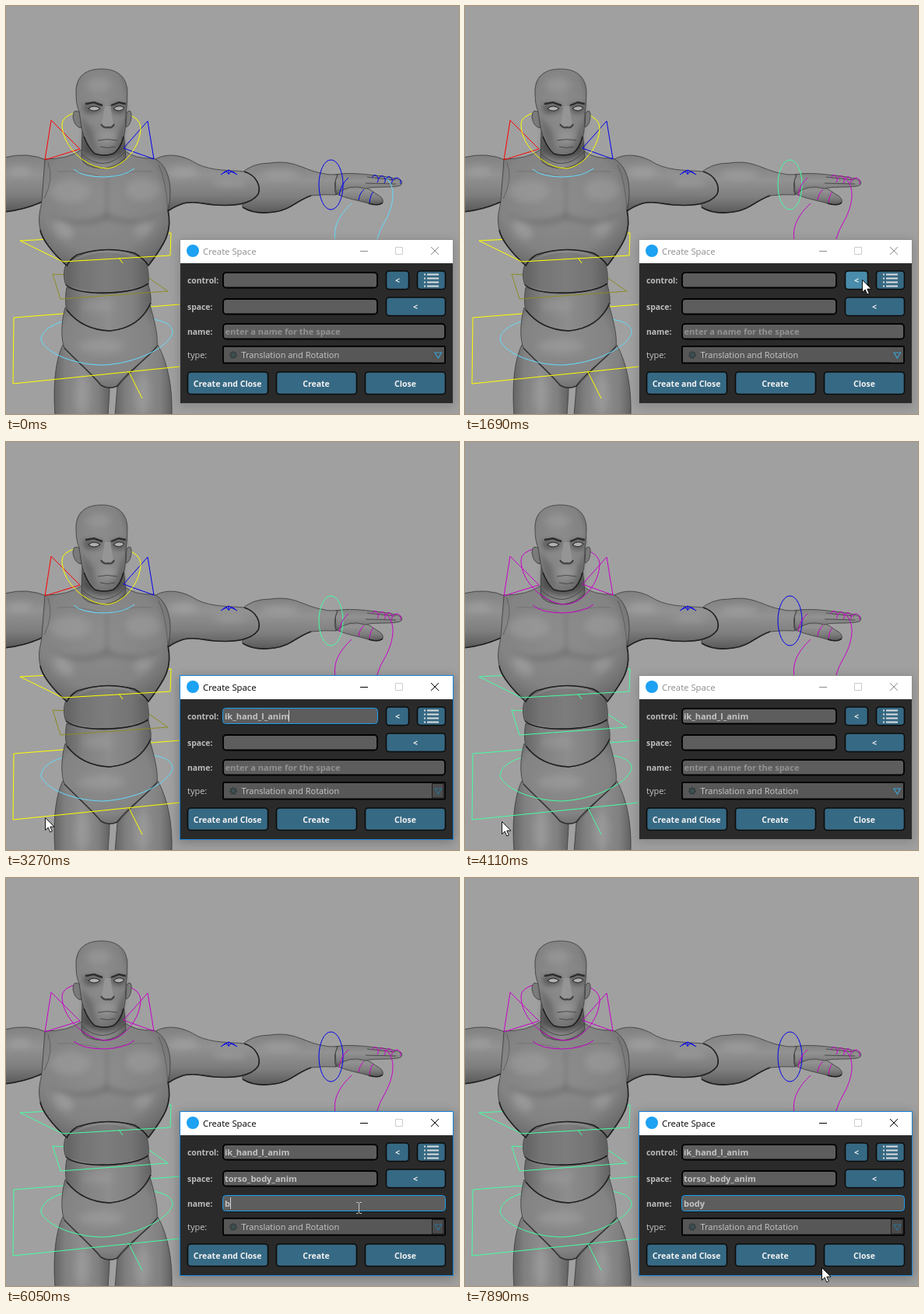
These frames come from a looping animation (582x525 px, 8 s). An HTML page:

```html
<!DOCTYPE html>
<html lang="en">
<head>
<meta charset="utf-8">
<title>Create Space</title>
<style>
html, body { margin: 0; width: 100%; height: 100%; overflow: hidden; background: #a0a0a0; }
svg {
  display: block; width: 100vw; height: 100vh;
  --hand: #00e; --curve: #64dcff; --finger: #00e;
  --rig: #ff0; --mid: #8c8c22; --hip: #64dcff;
  --neck: #ff0; --collar: #64dcff; --left: #f00; --right: #00e;
  --frame: #8d8d8d; --title: #8c8c8c; --shade: .16; --arrow: #3c9fd0; --drop: #555; --dropEdge: #555;
  --control: 0; --name: 0;
  --pick: #366984; --spaceBtn: #366984; --closeBtn: #366984;
  --t1: 0; --t2: 0; --hint: 1; --b: 0; --o: 0; --d: 0; --y: 0; --caret: 0;
  animation: scene 8s step-end -8ms infinite;
}
@keyframes scene {
  15.125% { --hand: #43ffa3; --curve: #c800c8; --finger: #c800c8; }
  19.625% { --pick: #4a8cab; }
  24.25% { --frame: #1883d7; --title: #000; --shade: .26; --arrow: #2f6f8f; --drop: #4b4b4b; --dropEdge: #1c1c1c; --control: 1; }
  25.75% { --t1: 1; --caret: 1; }
  30.375% { --caret: 0; }
  34.875% { --pick: #366984; }
  36.375% { --caret: 1; }
  42.375% { --frame: #8d8d8d; --title: #8c8c8c; --shade: .16; --arrow: #3c9fd0; --drop: #555; --dropEdge: #555; --control: 0; --caret: 0; }
  43.875% {
    --hand: #00e; --rig: #43ffa3; --mid: #43ffa3; --hip: #43ffa3;
    --neck: #c800c8; --collar: #c800c8; --left: #c800c8; --right: #c800c8;
  }
  60.375% { --spaceBtn: #4a8cab; }
  61.875% { --frame: #1883d7; --title: #000; --shade: .26; --arrow: #2f6f8f; --drop: #4b4b4b; --dropEdge: #1c1c1c; --control: 1; --caret: 1; }
  64.875% { --t2: 1; }
  66.375% { --control: 0; --name: 1; --spaceBtn: #366984; }
  72.5% { --caret: 0; }
  75.625% { --hint: 0; --b: 1; --caret: 1; }
  80.25% { --o: 1; }
  81.75% { --d: 1; }
  86.375% { --y: 1; }
  94.125% { --caret: 0; }
  95.625% { --closeBtn: #4a8cab; }
  98.625% { --closeBtn: #366984; }
  100% {
    --hand: #00e; --curve: #c800c8; --finger: #c800c8; --rig: #43ffa3; --mid: #43ffa3; --hip: #43ffa3;
    --t1: 1; --t2: 1; --hint: 0;
  }
}
#arrow { opacity: 0; animation: arrow 8s step-end -8ms infinite; }
@keyframes arrow {
  0% { opacity: 0; transform: translate(512px, 271px); }
  4.625% { opacity: 1; transform: translate(512px, 271px); }
  6.125% { transform: translate(498px, 262px); }
  7.625% { transform: translate(471px, 241px); }
  9.125% { transform: translate(444px, 218px); }
  10.625% { transform: translate(424px, 203px); }
  12.125% { transform: translate(416px, 197px); }
  13.625% { transform: translate(421px, 199px); }
  16.625% { transform: translate(446px, 242px); }
  18.125% { transform: translate(484px, 309px); }
  19.625% { transform: translate(507px, 347px); }
  21.125% { transform: translate(510px, 352px); }
  30.375% { transform: translate(507px, 352px); }
  33.375% { transform: translate(499px, 357px); }
  34.875% { transform: translate(430px, 385px); }
  36.375% { transform: translate(320px, 425px); }
  37.875% { transform: translate(200px, 458px); }
  39.375% { transform: translate(100px, 477px); }
  40.875% { transform: translate(50px, 483px); }
  42.375% { transform: translate(34px, 484px); }
  46.875% { transform: translate(36px, 485px); }
  49.875% { transform: translate(41px, 486px); }
  51.375% { transform: translate(47px, 488px); }
  52.875% { transform: translate(73px, 505px); }
  54.375% { transform: translate(140px, 498px); }
  55.875% { transform: translate(280px, 462px); }
  57.375% { transform: translate(440px, 414px); }
  58.875% { transform: translate(569px, 378px); }
  60.375% { transform: translate(525px, 378px); }
  61.875% { transform: translate(501px, 380px); }
  66.375% { opacity: 0; transform: translate(453px, 424px); }
  94.125% { opacity: 1; transform: translate(453px, 445px); }
  95.625% { transform: translate(463px, 475px); }
  97.125% { transform: translate(463px, 491px); }
  98.625%, 100% { opacity: 1; transform: translate(458px, 501px); }
}
#beam { opacity: 0; animation: beam 8s step-end -8ms infinite; }
@keyframes beam { 66.375% { opacity: 1; } 94.125% { opacity: 0; } }
#caret { opacity: var(--caret); animation: caret 8s step-end -8ms infinite; }
@keyframes caret {
  0% { transform: translate(363px, 345px); }
  66.375% { transform: translate(281px, 411px); }
  75.625% { transform: translate(288px, 411px); }
  80.25% { transform: translate(295px, 411px); }
  81.75% { transform: translate(302px, 411px); }
  86.375%, 100% { transform: translate(308px, 411px); }
}
text { font: 11px "Open Sans", "Noto Sans", sans-serif; fill: #c8c8c8; }
.label { font-size: 10.4px; font-weight: 700; fill: #bdbdbd; }
.value { font-weight: 700; fill: #c4c4c4; }
.btn text { font-size: 10.5px; font-weight: 700; fill: #f2f2f2; text-anchor: middle; }
.btn rect { fill: #366984; stroke: #0c0c0c; stroke-width: 1.6; }
.field rect { fill: #5d5d5d; stroke: #000; stroke-width: 1.8; }
.field .focus { stroke: #1a9ff0; stroke-width: 1; }
.rig path, .rig ellipse { fill: none; stroke-width: 1; }
.body { stroke: #3a3a3a; stroke-width: .8; stroke-linejoin: round; }
.glow { fill: #b2b2b2; filter: blur(5px); }
.dark { fill: #404040; filter: blur(3px); }
.edge { fill: none; stroke: #202020; stroke-width: 1.6; }
.line { fill: none; stroke: #4a4a4a; stroke-width: 1; }
</style>
</head>
<body>
<svg viewBox="0 0 582 525">
  <defs>
    <radialGradient id="ball" cx=".47" cy=".42" r=".66">
      <stop offset="0" stop-color="#8d8d8d"/><stop offset=".7" stop-color="#838383"/><stop offset="1" stop-color="#666"/>
    </radialGradient>
    <linearGradient id="tube" x2="0" y2="1">
      <stop offset="0" stop-color="#818181"/><stop offset=".35" stop-color="#929292"/>
      <stop offset=".7" stop-color="#7e7e7e"/><stop offset="1" stop-color="#595959"/>
    </linearGradient>
    <linearGradient id="limb">
      <stop offset="0" stop-color="#656565"/><stop offset=".2" stop-color="#808080"/><stop offset=".5" stop-color="#8d8d8d"/>
      <stop offset=".8" stop-color="#808080"/><stop offset="1" stop-color="#626262"/>
    </linearGradient>
  </defs>
  <rect width="582" height="525" fill="#a0a0a0"/>

  <!-- control curves behind the figure -->
  <g class="rig">
    <path stroke="var(--neck)" d="M90 137Q72 142 72 152M155 139Q172 144 173 156"/>
    <path stroke="var(--rig)" d="M18 302L212 292M10 401L223 384"/>
    <path stroke="var(--mid)" d="M60 345L185 351L208 367"/>
    <path stroke="var(--hip)" d="M45 430C45 414 70 405 90 402M180 402C202 404 215 410 214 421"/>
  </g>

  <!-- torso and legs -->
  <g class="body" fill="url(#limb)">
    <path d="M73 436C64 455 60 485 63 527H131C132 510 133 500 133 490Z"/>
    <path d="M195 436C208 460 214 490 213 527H140L143 490Z"/>
    <path fill="url(#ball)" d="M76 388C70 410 71 430 75 440C92 458 112 475 122 488Q132 494 143 489C155 472 180 455 194 438C196 425 190 402 185 385Q172 412 132 418Q95 412 76 388Z"/>
    <path d="M78 362C76 372 76 384 78 391Q98 417 134 418Q172 414 186 382C187 372 184 365 183 358Q130 380 78 362Z"/>
    <path d="M78 330C73 340 74 352 77 359Q90 370 130 369Q168 368 183 357C184 345 182 335 179 327Q130 296 78 330Z"/>
  </g>
  <path d="M78 333Q130 302 181 332V357Q130 378 77 359Z" fill="#555" opacity=".28"/>
  <ellipse class="glow" cx="98" cy="500" rx="10" ry="24" opacity=".3"/>
  <ellipse class="glow" cx="175" cy="500" rx="10" ry="24" opacity=".3"/>
  <ellipse class="glow" cx="122" cy="438" rx="30" ry="9" opacity=".3"/>
  <ellipse class="glow" cx="118" cy="386" rx="20" ry="9" opacity=".25"/>
  <path class="edge" d="M77 359Q90 370 130 369Q168 368 183 357M78 391Q98 417 134 418Q172 414 186 382" stroke-width="1.200"/>
  <path class="edge" d="M75 440C92 458 112 475 122 488Q132 494 143 489C155 472 180 455 194 438" opacity=".7"/>

  <!-- arms and hand -->
  <g class="body" fill="url(#tube)">
    <path d="M-2 195Q28 187 54 199C50 215 52 240 46 252Q25 262 -2 265Z"/>
    <path d="M437 228C448 226 462 232 476 242Q486 247 484 253Q478 258 466 254C452 250 438 248 425 242Z"/>
    <path d="M423 217C440 214 458 216 474 218Q498 220 508 225Q511 231 502 232C486 234 472 232 462 235Q440 228 424 243Z"/>
    <path d="M302 216Q315 202 340 202C368 198 378 208 400 214Q414 218 426 217Q420 230 424 243Q410 242 392 244C374 250 366 262 345 265Q320 269 304 259Z"/>
    <path d="M188 200C200 190 222 188 245 203C265 213 290 211 306 213C322 218 328 232 324 242C316 254 296 258 268 256C250 254 240 251 228 254Q216 258 208 264C213 240 200 212 188 200Z"/>
  </g>
  <path class="edge" d="M-2 265Q25 262 46 252M392 244C374 250 366 262 345 265Q320 269 304 259M208 264Q216 258 228 254C240 251 250 254 268 256C296 258 316 254 324 242C328 232 322 218 306 213M484 253Q478 258 466 254" stroke-width="1.200"/>
  <ellipse class="glow" cx="228" cy="213" rx="18" ry="7" opacity=".4"/>
  <ellipse class="glow" cx="288" cy="228" rx="22" ry="5" opacity=".35"/>
  <ellipse class="glow" cx="352" cy="216" rx="24" ry="5" opacity=".45"/>
  <ellipse class="glow" cx="18" cy="212" rx="16" ry="6" opacity=".4"/>
  <path class="line" d="M426 217Q420 230 424 243M464 220L500 224M462 228L501 229"/>

  <!-- chest -->
  <path class="body" fill="url(#ball)" d="M50 197Q80 197 97 185L152 186Q165 197 190 196C210 205 215 235 208 262C214 290 205 305 183 334C178 326 172 322 165 318Q128 308 92 320Q84 324 78 334C60 318 46 300 44 288C40 270 45 262 46 250Z"/>
  <ellipse class="glow" cx="82" cy="238" rx="26" ry="15" opacity=".32"/>
  <ellipse class="glow" cx="176" cy="236" rx="22" ry="15" opacity=".32"/>
  <ellipse class="glow" cx="74" cy="288" rx="15" ry="9" opacity=".45" transform="rotate(40 74 288)"/>
  <ellipse class="glow" cx="176" cy="286" rx="13" ry="9" opacity=".36" transform="rotate(-40 176 286)"/>
  <path class="dark" d="M56 266Q90 284 129 266Q165 284 204 263Q180 290 131 276Q85 292 56 266Z" opacity=".2"/>
  <path class="line" d="M66 213Q95 211 121 219M137 219Q160 211 188 213" opacity=".3"/>
  <path class="dark" d="M128 221H131V272H128Z" opacity=".25"/>
  <path class="line" d="M54 201Q62 222 49 248M196 204Q206 226 208 262" opacity=".6"/>
  <path class="edge" d="M208 262C214 290 205 305 183 334C178 326 172 322 165 318Q128 308 92 320Q84 324 78 334C60 318 46 300 44 288"/>

  <!-- neck and head -->
  <path class="body" fill="url(#limb)" d="M98 160L97 196Q100 208 124 209Q148 208 154 195L151 160Z"/>
  <path class="dark" d="M99 167Q125 206 152 172V188Q125 208 99 187Z" opacity=".75"/>
  <path class="line" d="M97 190Q125 216 153 188M97 196Q125 222 154 195"/>
  <g class="body" fill="#7b7b7b">
    <path d="M95 137Q86 131 86 143Q88 156 97 157Z"/>
    <path d="M155 137Q162 131 161 143Q160 154 154 156Z"/>
    <path fill="url(#ball)" d="M94 136C90 126 90 118 90 108C91 89 104 81 123 81C144 81 156 92 156 112Q156 126 154 138L153 160C151 172 148 183 138 190Q126 194 114 190C106 183 100 170 97 156Z"/>
  </g>
  <ellipse class="glow" cx="119" cy="101" rx="16" ry="9" opacity=".3"/>
  <path class="dark" d="M97 142L112 160L116 188Q104 180 99 162ZM153 142L146 160L140 188Q150 178 152 162Z" opacity=".35"/>
  <path class="dark" d="M99 126H123V135Q111 141 101 137ZM135 126H154V136Q145 141 136 136Z" opacity=".6"/>
  <path d="M102 126L113 124L124 128M135 128L145 124L154 126" fill="none" stroke="#2c2c2c" stroke-width="2.400"/>
  <path d="M106 132Q113 126 121 132Q113 138 106 132ZM138 132Q145 126 152 131Q146 138 138 132Z" fill="#b0b0b0" stroke="#272727"/>
  <path d="M127 129L123 152Q131 157 138 152L134 129Z" fill="#959595"/>
  <path d="M122 152Q126 158 131 156Q136 158 139 152" fill="none" stroke="#3c3c3c" stroke-width="2"/>
  <ellipse class="glow" cx="130" cy="168" rx="11" ry="7" opacity=".4"/>
  <path class="line" d="M118 173Q130 170 143 173M121 181Q130 184 140 181"/>
  <path class="edge" d="M100 168Q106 183 114 190Q126 194 138 190Q147 184 151 168"/>

  <!-- control curves in front -->
  <g class="rig">
    <path stroke="#00e" d="M276 217L286 211L297 217M278 216Q282 210 286 216Q291 210 295 216M286 211V217"/>
    <path stroke="var(--left)" d="M58 147L50 198L95 184"/>
    <path stroke="var(--left)" d="M58 147L95 184" stroke-width=".7"/>
    <path stroke="var(--right)" d="M151 183L182 148L190 197Z"/>
    <path stroke="var(--neck)" d="M72 152C72 171 85 188 99 198Q114 209 130 209C151 207 173 182 173 156"/>
    <path stroke="var(--collar)" d="M87 210Q98 220 126 220Q153 219 165 209"/>
    <path stroke="var(--rig)" d="M18 302L73 329L211 321L212 292M145 324L150 331M10 401L9 486L223 464M158 471L175 505"/>
    <path stroke="var(--mid)" d="M60 345L70 377L208 367"/>
    <path stroke="var(--hip)" d="M45 430C53 449 92 462 125 462C165 460 207 441 214 421"/>
    <ellipse stroke="var(--hand)" cx="417.500" cy="230" rx="15.500" ry="32"/>
    <path stroke="var(--curve)" d="M423 302C420 284 428 269 444 254M488 221C501 232 499 254 488 275Q480 288 476 302"/>
    <path stroke="var(--finger)" d="M428 244Q430 229 440 221M453 250Q454 241 460 236M467 253Q468 243 472 239M470 221q4-7 8 0q1 4-1 6M479 222q4-7 8 0q1 4-1 6M488 223q4-7 8 0q1 4-1 5M497 224q5-6 10 0v5"/>
  </g>

  <!-- dialog -->
  <rect x="222" y="302" width="354" height="213" style="filter:blur(7px);opacity:var(--shade)"/>
  <rect x="223.500" y="300.500" width="351" height="211" fill="#2a2a2a" stroke="var(--frame)"/>
  <rect x="224" y="301" width="350" height="30" fill="#fff"/>
  <circle cx="240" cy="315" r="8" fill="#1da1f2"/>
  <text x="253" y="320" style="font-size:11.300px;fill:var(--title)">Create Space</text>
  <g fill="none" stroke="var(--title)">
    <path d="M455 315.500H465M546 310L556 320M556 310L546 320"/>
    <path d="M500.500 310.500h9v9h-9Z" stroke="#ccc"/>
  </g>

  <text class="label" x="233" y="357">control:</text>
  <text class="label" x="233" y="391">space:</text>
  <text class="label" x="233" y="423">name:</text>
  <text x="233" y="453">type:</text>
  <g class="field">
    <rect x="279" y="343" width="198" height="19.500" rx="4"/>
    <rect x="279" y="377" width="198" height="19.500" rx="4"/>
    <rect x="279" y="409" width="285" height="19.500" rx="4"/>
    <rect x="279" y="438" width="285" height="21.500" rx="1" style="fill:#575757"/>
    <rect class="focus" x="278.500" y="342.500" width="199" height="20" rx="4" style="opacity:var(--control)"/>
    <rect class="focus" x="278.500" y="408.500" width="286" height="20" rx="4" style="opacity:var(--name)"/>
  </g>
  <text class="value" x="281" y="357" style="opacity:var(--t1)">ik_hand_l_anim</text>
  <text class="value" x="281" y="391" style="opacity:var(--t2)">torso_body_anim</text>
  <text class="value" x="281.500" y="423" style="fill:#929292;opacity:var(--hint)">enter a name for the space</text>
  <text class="value" x="281" y="423"><tspan style="fill-opacity:var(--b)">b</tspan><tspan style="fill-opacity:var(--o)">o</tspan><tspan style="fill-opacity:var(--d)">d</tspan><tspan style="fill-opacity:var(--y)">y</tspan></text>
  <rect id="caret" width="1" height="15" fill="#d8d8d8"/>

  <circle cx="292" cy="449" r="3.500" fill="#3f5356" stroke="#303a3b" stroke-width="2.500" stroke-dasharray="2 1"/>
  <text x="302.500" y="453">Translation and Rotation</text>
  <rect x="547.500" y="439.500" width="14.500" height="18.500" fill="var(--drop)" stroke="var(--dropEdge)"/>
  <path d="M551 446H559.500L555.300 453Z" fill="none" stroke="var(--arrow)" stroke-width="1.200"/>

  <g class="btn">
    <rect x="488.500" y="341" width="29" height="23.500" rx="4" style="fill:var(--pick)"/>
    <text x="503" y="357">&lt;</text>
    <rect x="528.500" y="341" width="36" height="23.500" rx="4"/>
    <path d="M541 345.500H556M541 350.500H556M541 355.500H556M541 360.500H556M537 345.500h2M537 350.500h2M537 355.500h2M537 360.500h2" stroke="#dedede" stroke-width="2"/>
    <rect x="488.500" y="375" width="76" height="23.500" rx="4" style="fill:var(--spaceBtn)"/>
    <text x="526" y="391">&lt;</text>
    <rect x="233.500" y="471" width="103" height="28.500" rx="4"/>
    <text x="284.700" y="490">Create and Close</text>
    <rect x="347.500" y="471" width="103" height="28.500" rx="4"/>
    <text x="398.500" y="490">Create</text>
    <rect x="461.500" y="471" width="103" height="28.500" rx="4" style="fill:var(--closeBtn)"/>
    <text x="513" y="490">Close</text>
  </g>

  <path id="beam" d="M450 417.500h2.500l1 1l1-1h2.500M453.500 418V431M450 431.500h2.500l1-1l1 1h2.500" fill="none" stroke="#c8c8c8"/>
  <path id="arrow" d="M.500 .500V16.500L4.200 13L6.700 19L9.300 17.900L6.800 12.100H12Z" fill="#fff" stroke="#000" stroke-width=".9"/>
</svg>
</body>
</html>
```
